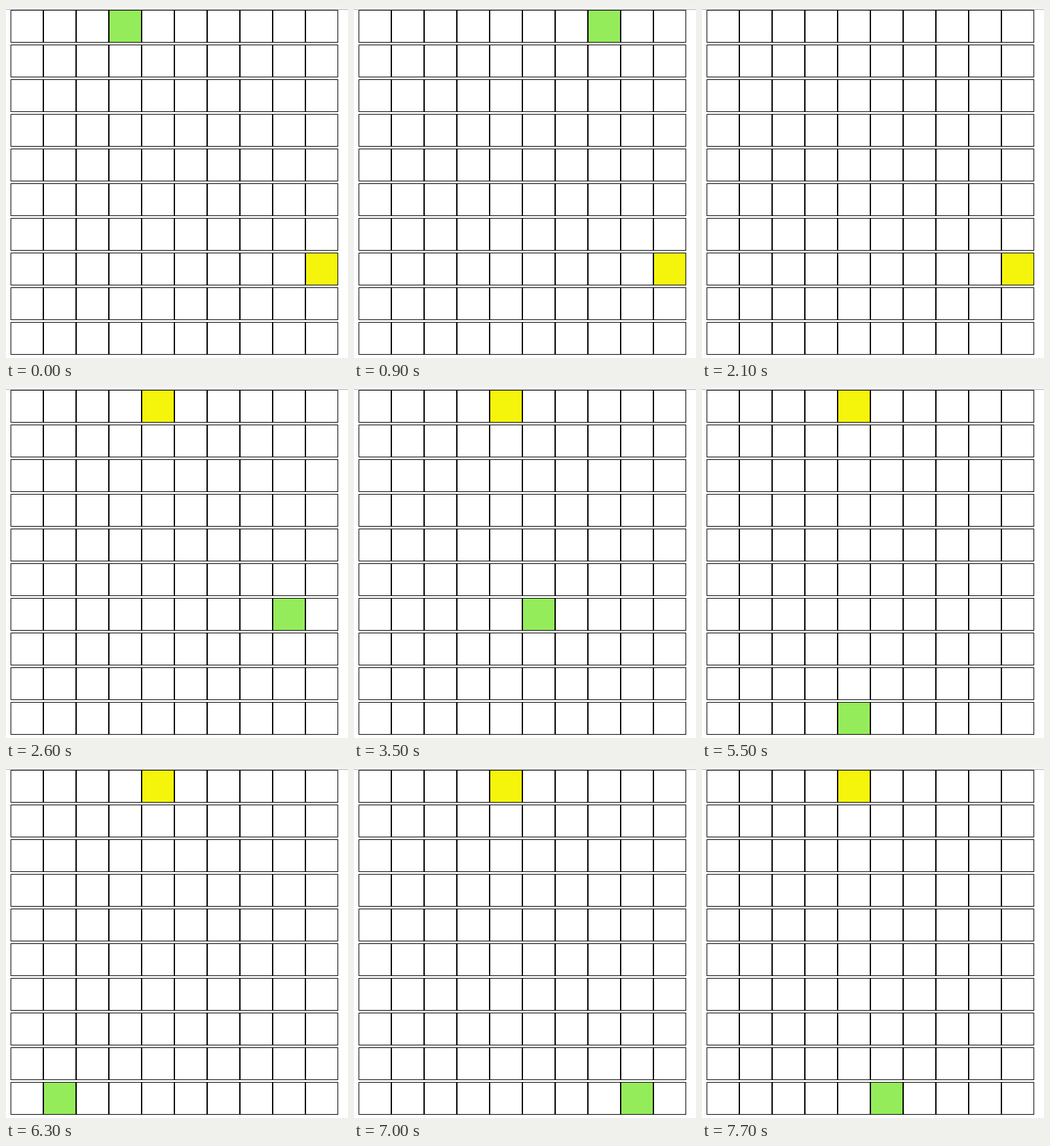
Animation of 522 by 538 pixels, one loop 8 s. Source, as an HTML page:

```html
<!DOCTYPE html>
<html lang="en">
<head>
<meta charset="utf-8">
<title>Grid walker</title>
<style>
  html, body { margin: 0; width: 100%; height: 100%; overflow: hidden; background: #fff; }
  svg { display: block; }
</style>
</head>
<body>
<svg id="stage" width="522" height="538" viewBox="0 0 522 538" shape-rendering="crispEdges">
  <rect width="522" height="5" fill="#f2f2f2"/>
  <rect y="5" width="522" height="1" fill="#b8b8b8"/>
</svg>
<script>
const LOOP = 8000;
const SIZE = 10;
const GREEN = '#95ec5a';
const YELLOW = '#f5f50c';

// One move per tick; tick times are in tenths of a second.
const moves = 'R'.repeat(6) + 'U'.repeat(4) + 'L'.repeat(4) + 'U'.repeat(7) + 'L'.repeat(10);
const ticks = [1, 4, 6, 9, 11, 14, 16, 19, 21, 24, 26, 30, 32, 35, 37, 40,
  42, 45, 47, 50, 52, 55, 57, 60, 63, 66, 67, 70, 72, 75, 77];
const delta = { R: [1, 0], L: [-1, 0], U: [0, -1] };
const wrap = n => (n + SIZE) % SIZE;

const stage = document.getElementById('stage');

function addRect(size, fill) {
  const rect = document.createElementNS('http://www.w3.org/2000/svg', 'rect');
  rect.setAttribute('width', size);
  rect.setAttribute('height', size);
  rect.setAttribute('fill', fill);
  stage.append(rect);
  return rect;
}

function place(rect, [col, row], inset) {
  rect.setAttribute('x', 7 + 50 * col + inset);
  rect.setAttribute('y', 6 + 53 * row + inset);
}

for (let row = 0; row < SIZE; row++) {
  for (let col = 0; col < SIZE; col++) {
    place(addRect(50, '#000'), [col, row], 0);
    place(addRect(48, '#fff'), [col, row], 1);
  }
}
const walker = addRect(48, GREEN);
const food = addRect(48, YELLOW);

function walkerAt(time) {
  let [col, row] = [3, 0];
  for (let i = 0; i < ticks.length && time >= ticks[i] * 100; i++) {
    const [dx, dy] = delta[moves[i]];
    col = wrap(col + dx);
    row = wrap(row + dy);
  }
  return [col, row];
}

function draw(time) {
  place(walker, walkerAt(time), 1);
  place(food, time < 2400 ? [9, 7] : [4, 0], 1);
}

function loop() {
  draw(performance.now() % LOOP);
  requestAnimationFrame(loop);
}
loop();
</script>
</body>
</html>
```
